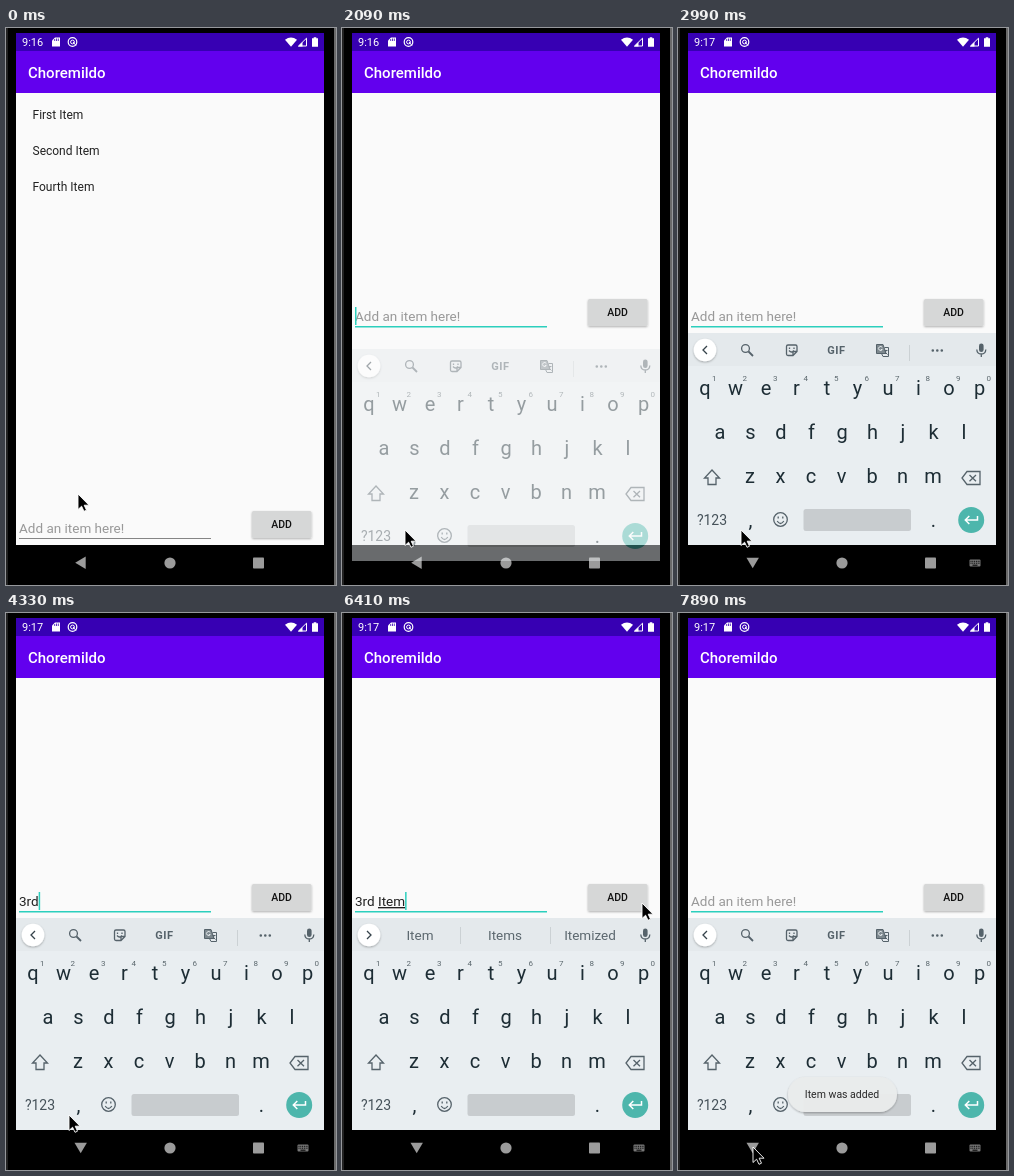
Write an HTML page that moves like this. It is 330 by 557 pixels and loops after 8000 ms.

```html
<!DOCTYPE html>
<html lang="en">
<head>
<meta charset="utf-8">
<title>To-do list</title>
<style>
  html, body { margin: 0; width: 100%; height: 100%; overflow: hidden; background: #000; }
  svg { display: block; font-family: Roboto, sans-serif; }
  text { white-space: pre; }
  .mid { text-anchor: middle; }
  .item { font-size: 12px; fill: #222; }
  .entry { font-size: 13.5px; fill: #212121; }
  .entry tspan { text-decoration: underline; }
  .key { font-size: 20px; fill: #1d2d35; }
  .digit { font-size: 8px; fill: #5b676d; }
  .small { font-size: 14px; fill: #455159; }
  .word { font-size: 13.5px; fill: #5c686f; }
  .line { fill: none; stroke: #55626a; stroke-width: 1.3; }
</style>
</head>
<body>
<svg width="330" height="557" viewBox="0 0 330 557">
  <defs>
    <filter id="shadow" x="-20%" y="-30%" width="140%" height="180%">
      <feDropShadow dx="0" dy="1" stdDeviation=".8" flood-opacity=".3"/>
    </filter>
    <filter id="lifted" x="-20%" y="-30%" width="140%" height="190%">
      <feDropShadow dx="0" dy="2" stdDeviation="2" flood-opacity=".42"/>
    </filter>
  </defs>

  <!-- phone body -->
  <rect width="330" height="557"/>
  <path d="M1 0V557" stroke="#222" stroke-width="2"/>
  <path d="M329 0V557" stroke="#6a6a6a" stroke-width="2"/>

  <!-- status and app bars -->
  <rect x="10" y="5" width="308" height="18" fill="#3700b3"/>
  <rect x="10" y="23" width="308" height="42" fill="#6200ee"/>
  <g fill="#fff">
    <text id="clock" x="16" y="18" font-size="11"></text>
    <path d="M49 9.5H54V18.5H46V12.5Z"/>
    <path d="M48.7 11V13M50.5 10.5V13M52.3 10.5V13" stroke="#3700b3" stroke-width=".8"/>
    <circle cx="66.5" cy="14" r="4.3" fill="none" stroke="#fff" stroke-width="1.2"/>
    <circle cx="66.5" cy="14" r="1.9" fill="none" stroke="#fff"/>
    <path d="M67 14L70 17.5" stroke="#fff"/>
    <path d="M279 11.8Q285 7.2 291 11.8L285 18.7Z"/>
    <path d="M300.5 10.2V18H292.5Z" fill="none" stroke="#fff"/>
    <path d="M296.5 14V18.5H292Z"/>
    <path d="M306 10.3H307.7V9.2H310.3V10.3H312V18.7H306Z"/>
    <text x="22" y="50" font-size="15" font-weight="500">Choremildo</text>
  </g>

  <!-- page -->
  <rect x="10" y="65" width="308" height="452" fill="#fafafa"/>
  <g id="list" class="item">
    <text x="26.5" y="91">First Item</text>
    <text x="26.5" y="127">Second Item</text>
    <text x="26.5" y="163">Fourth Item</text>
  </g>
  <g id="form">
    <text id="hint" class="entry" x="13" y="505" style="fill:#999">Add an item here!</text>
    <text id="entry" class="entry" x="13" y="505"></text>
    <rect id="caret" y="491" width="1.5" height="18" fill="#2ccfbd"/>
    <rect id="rule" x="13" y="510" width="192"/>
    <rect id="button" x="246" y="483" width="59.5" height="27" rx="1.5" fill="#d6d7d7"/>
    <text class="mid" x="275.5" y="500" font-size="10.5" font-weight="500" fill="#111">ADD</text>
  </g>

  <!-- navigation bar -->
  <rect x="10" y="517" width="308" height="40"/>
  <g fill="#9b9b9b">
    <path id="back" d="M-5.5 0L5-6.2V6.2Z"/>
    <circle cx="164" cy="535" r="5.6"/>
    <rect x="247" y="529.5" width="11" height="11" rx=".8"/>
    <g id="switcher" fill="#777">
      <rect x="291.5" y="531.5" width="11" height="7" rx="1"/>
      <path d="M292.5 533.3H302M292.5 535.2H302" stroke="#000" stroke-dasharray="1 .8"/>
      <path d="M294.5 537.2H299.5" stroke="#000"/>
    </g>
  </g>

  <!-- keyboard -->
  <g id="keyboard">
    <rect x="10" y="305" width="308" height="212" fill="#e9eef1"/>
    <rect x="10" y="305" width="308" height="33" fill="#e4e9ec"/>
    <circle cx="27" cy="322" r="11.3" fill="#fff" filter="url(#shadow)"/>
    <path id="chevron" class="line" style="stroke:#35424a"/>
    <g id="tools" class="line">
      <circle cx="67.5" cy="320.5" r="3.9"/>
      <path d="M70.5 323.5L75 328" stroke-width="1.8"/>
      <path d="M108.5 318.5Q108.5 317 110 317H117.5Q119 317 119 318.5V323.5L115 327.5H110Q108.5 327.5 108.5 326ZM119 323.5H115V327.5M111 322.5Q113.5 325.5 116 322.5M111.5 319.5V321M116 319.5V321"/>
      <text class="mid" x="158.3" y="326" font-size="11" font-weight="700" letter-spacing=".5" fill="#55626a" stroke="none">GIF</text>
      <g stroke-width="1">
        <path d="M198.5 316.5H205L208 325.5H198.5Z" fill="#7d888e"/>
        <path d="M206.5 319.5H210.5V328.5H205L203.5 325.5M206.5 322.5H209.5M208 322.5Q207.5 325 206.5 326M207 324L209.5 326.5"/>
        <path d="M204.3 319.5A2 2 0 1 0 204.3 321.5H202.8" stroke="#e4e9ec"/>
      </g>
      <path d="M231.5 317V333" stroke="#cbd1d4" stroke-width="1"/>
      <path d="M254.8 322.5h0M259.3 322.5h0M263.8 322.5h0" stroke-width="2.6" stroke-linecap="round"/>
    </g>
    <g id="words" class="word mid">
      <text x="78" y="327"></text><text x="163" y="327"></text><text x="248" y="327"></text>
      <path d="M118.5 314V331M208.5 314V331" stroke="#cbd1d4"/>
    </g>
    <rect x="301" y="315.5" width="4.6" height="8.5" rx="2.3" fill="#55626a"/>
    <path class="line" d="M298.8 321.5Q299 326 303.3 326T307.8 321.5M303.3 326V329"/>
    <g id="keys" class="mid"></g>
    <path class="line" d="M34 442L41.5 450H38V456.5H30V450H26.5Z"/>
    <path class="line" d="M289 443.5H302V456.5H289L284 450ZM291.5 447L298 453.3M298 447L291.5 453.3"/>
    <circle class="line" cx="102.5" cy="491.5" r="6.8"/>
    <path class="line" d="M99.2 493Q102.5 498 105.8 493M100.2 488.5V490.5M104.8 488.5V490.5"/>
    <rect x="125.5" y="481" width="107.5" height="22" rx="2.5" fill="#c8cccf"/>
    <circle cx="293.2" cy="492" r="13" fill="#4db6ac"/>
    <path d="M299.5 488V492H287.5M291.3 488L287.3 492L291.3 496" fill="none" stroke="#fff" stroke-width="1.5"/>
  </g>

  <g id="toast">
    <rect x="110" y="464" width="109" height="35" rx="17.5" fill="#eaecec" filter="url(#shadow)"/>
    <text class="mid" x="164" y="485" font-size="10.5" fill="#222">Item was added</text>
  </g>

  <path id="cursor" d="M0 0V15.5L3.6 12.2L6 17.3L8.5 16.2L6.2 11.2H11Z" fill="#000" stroke="#fff" stroke-width=".9"/>
</svg>

<script>
const $ = id => document.getElementById(id);
const LOOP = 8000;

const label = (x, y, cls, s) => `<text class="${cls}" x="${x}" y="${y}">${s}</text>`;
const row = (letters, x, y, cls = 'key') =>
  [...letters].map((c, i) => label(x + i * 30.5, y, cls, c)).join('');
$('keys').innerHTML =
  row('qwertyuiop', 27, 367) + row('asdfghjkl', 42, 411) + row('zxcvbnm', 72, 455) +
  row('1234567890', 36.3, 352.5, 'digit') +
  label(34, 497, 'small', '?123') + label(72.5, 499, 'key', ',') + label(255.5, 499, 'key', '.');

// Each track holds [start ms, ...values]; a value stays until the next start.
const tracks = {
  cursor: [[0, 72, 466], [150, 68, 483], [300, 64, 499], [1950, 63, 502],
    [5970, 96, 470], [6120, 205, 370], [6260, 318, 300], [6410, 300, 290], [6560, 281, 287],
    [7000, 242, 330], [7150, 196, 391], [7300, 139, 456], [7450, 98, 507], [7590, 79, 532], [7740, 75, 534]],
  typed: [[0, ''], [3880, '3'], [4180, '3r'], [4330, '3rd'], [4780, '3rd '], [5080, '3rd I'],
    [5370, '3rd It'], [5520, '3rd Item'], [6850, '']],
  words: [[0, ''], [4780, 'and day of'], [5080, 'I In It'], [5370, 'It Its Item'],
    [5520, 'Item Items Itemized'], [7150, '']],
  caret: [[0, 0], [1800, 1], [2990, 0], [3430, 1], [5970, 0], [6410, 1], [7450, 0]],
  // keyboard offset, opacity, back-arrow turn
  keyboard: [[0, 26, 0, 0], [2090, 16, .45, 0], [2240, 3.5, .92, -40], [2390, 0, 1, -90]],
  pressed: [[0, 0], [6710, 1], [7150, 0]],
  toast: [[0, 0], [7590, .3], [7740, .7], [7890, .96]]
};
const at = (name, t) => tracks[name].findLast(step => t >= step[0]).slice(1);
const show = (id, on) => $(id).setAttribute('visibility', on ? 'visible' : 'hidden');
const set = (id, attrs) => Object.entries(attrs).forEach(([k, v]) => $(id).setAttribute(k, v));

function draw(t) {
  const [typed] = at('typed', t), [words] = at('words', t);
  const [offset, opacity, turn] = at('keyboard', t);
  const [x, y] = at('cursor', t);
  const focused = t >= 1800, raised = t >= 1950;

  $('clock').textContent = t < 2540 ? '9:16' : '9:17';
  show('list', !raised);
  set('form', { transform: `translate(0 ${raised ? -212 : 0})` });
  set('rule', focused ? { height: 1.5, fill: '#2ccfbd' } : { height: 1, fill: '#858585' });
  set('button', { filter: `url(#${at('pressed', t)[0] ? 'lifted' : 'shadow'})` });

  show('hint', !typed);
  $('entry').innerHTML = typed.replace(/I.*/, '<tspan>$&</tspan>');
  show('caret', at('caret', t)[0]);
  set('caret', { x: 13 + (typed && $('entry').getComputedTextLength()) });

  set('keyboard', { transform: `translate(0 ${offset})`, opacity });
  set('back', { transform: `translate(74.7 534.7) rotate(${turn})` });
  show('switcher', t >= 2240);
  set('chevron', { d: words ? 'M25 318L29 322L25 326' : 'M29 318L25 322L29 326' });
  show('tools', !words);
  show('words', words);
  words.split(' ').forEach((w, i) => { $('words').children[i].textContent = w; });

  set('toast', { opacity: at('toast', t)[0] });
  set('cursor', { transform: `translate(${x} ${y})` });
}

const start = performance.now();
function tick() {
  draw((performance.now() - start) % LOOP);
  requestAnimationFrame(tick);
}
tick();
</script>
</body>
</html>
```
